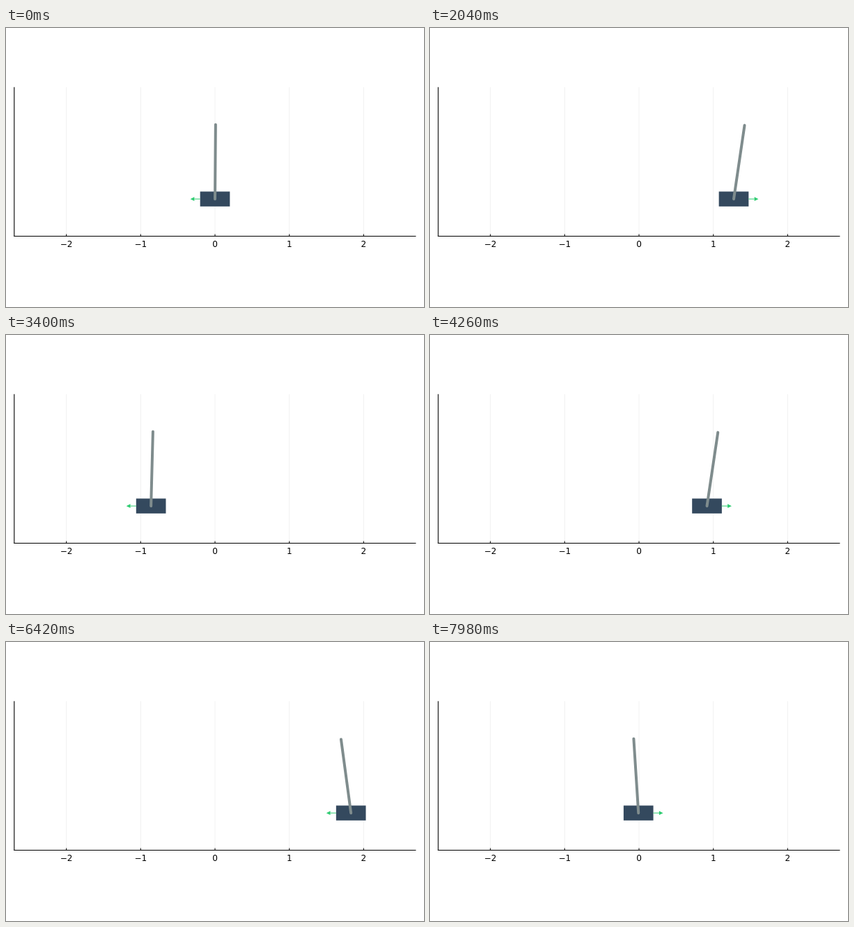
An HTML page with a canvas that plays this animation: 600x400 px, repeating every 8 s.

```html
<!DOCTYPE html>
<html>
<head>
<meta charset="utf-8">
<style>
html, body { margin: 0; width: 100%; height: 100%; overflow: hidden; background: #fff; }
canvas { display: block; width: 600px; height: 400px; }
</style>
</head>
<body>
<canvas id="stage"></canvas>
<script>
const canvas = document.getElementById('stage');
const ratio = window.devicePixelRatio || 1;
canvas.width = 600 * ratio;
canvas.height = 400 * ratio;
const ctx = canvas.getContext('2d');
ctx.scale(ratio, ratio);

const STEP = 20, STEPS = 400;
const UNIT = 106.7, MID = 300, GROUND = 245.15;
const LEFT = 11.8, RIGHT = 588.4, TOP = 84.8, BOTTOM = 298.5;
const WRAP = 2.4 * UNIT; // the cart leaves here and returns on the other side
const KICK = 0.445;      // speed gained by one push, px per step
const POS = 1, LEAN = 2;

// step, cart position in px before wrapping, pole angle in radians
const poses = [
  [0, 300, 0.008], [12, 295, 0.045], [41, 335, 0], [82, 399, -0.015],
  [102, 436, 0.146], [123, 525, 0.03], [170, 720.3, 0.026], [205, 880.7, 0.06],
  [213, 909.7, 0.148], [246, 1113, -0.06], [262, 1209.3, -0.016], [287, 1347, -0.01],
  [321, 1519.5, -0.134], [345, 1591, 0.03], [369, 1660, 0.11], [399, 1835.7, -0.064]
];

// Mean slope of one column between pose i and the next
function chord(i, col) {
  const a = poses[i], b = poses[i + 1];
  return (b[col] - a[col]) / (b[0] - a[0]);
}

// Slope at pose i: the chords on both sides, weighted towards the shorter one
function tangent(i, col) {
  const last = poses.length - 1;
  if (i === 0) return chord(0, col);
  if (i === last) return chord(last - 1, col);
  const before = poses[i][0] - poses[i - 1][0];
  const after = poses[i + 1][0] - poses[i][0];
  return (chord(i - 1, col) * after + chord(i, col) * before) / (before + after);
}

// Cubic Hermite curve through one column: value and slope at step k
function sample(col, k) {
  let i = 0;
  while (i < poses.length - 2 && k >= poses[i + 1][0]) i++;
  const h = poses[i + 1][0] - poses[i][0], u = (k - poses[i][0]) / h;
  const mean = chord(i, col), va = tangent(i, col), vb = tangent(i + 1, col);
  const c2 = 3 * mean - 2 * va - vb, c3 = va + vb - 2 * mean;
  return {
    value: poses[i][col] + h * u * (va + u * (c2 + u * c3)),
    slope: va + u * (2 * c2 + 3 * u * c3)
  };
}

function line(x1, y1, x2, y2, color, width) {
  ctx.strokeStyle = color;
  ctx.lineWidth = width;
  ctx.beginPath();
  ctx.moveTo(x1, y1);
  ctx.lineTo(x2, y2);
  ctx.stroke();
}

function drawAxes() {
  ctx.font = '12px "DejaVu Sans", sans-serif';
  ctx.textAlign = 'center';
  ctx.fillStyle = '#000';
  for (let n = -2; n <= 2; n++) {
    const x = MID + n * UNIT;
    line(x, TOP, x, BOTTOM, 'rgba(0,0,0,0.1)', 0.6);
    line(x, BOTTOM, x, BOTTOM - 3, '#000', 1);
    ctx.fillText(n < 0 ? '\u2212' + -n : String(n), x, 314);
  }
  line(LEFT, TOP, LEFT, BOTTOM + 0.5, '#000', 1.1);
  line(LEFT - 0.5, BOTTOM, RIGHT, BOTTOM, '#000', 1.1);
}

function drawArrow(x, dir) {
  const tip = x + dir * 35.4, neck = tip - dir * 5.8;
  line(x + dir * 0.2 * UNIT, GROUND, neck, GROUND, '#2ecc71', 1);
  ctx.fillStyle = '#2ecc71';
  ctx.beginPath();
  ctx.moveTo(tip, GROUND);
  ctx.lineTo(neck, GROUND - 2.9);
  ctx.lineTo(neck, GROUND + 2.9);
  ctx.fill();
}

function drawCart(x, angle, dir) {
  ctx.save();
  ctx.beginPath();
  ctx.rect(LEFT, TOP, RIGHT - LEFT, BOTTOM - TOP);
  ctx.clip();
  ctx.fillStyle = '#34495e';
  ctx.fillRect(x - 0.2 * UNIT, GROUND - 0.1 * UNIT, 0.4 * UNIT, 0.2 * UNIT);
  drawArrow(x, dir);
  ctx.lineCap = 'round';
  line(x, GROUND, x + UNIT * Math.sin(angle), GROUND - UNIT * Math.cos(angle), '#7f8c8d', 4);
  ctx.restore();
}

function draw(k) {
  const cart = sample(POS, k);
  const x = MID - WRAP + (cart.value - MID + WRAP) % (2 * WRAP);
  // Pushes alternate, doubling up whenever the speed moves on by one kick
  const dir = (Math.floor(cart.slope / KICK) + k) % 2 === 0 ? 1 : -1;
  ctx.fillStyle = '#fff';
  ctx.fillRect(0, 0, 600, 400);
  drawAxes();
  drawCart(x, sample(LEAN, k).value, dir);
}

const start = performance.now();
function tick() {
  const t = Math.max(0, performance.now() - start);
  draw(Math.floor(t / STEP) % STEPS);
  requestAnimationFrame(tick);
}
tick();
</script>
</body>
</html>
```
